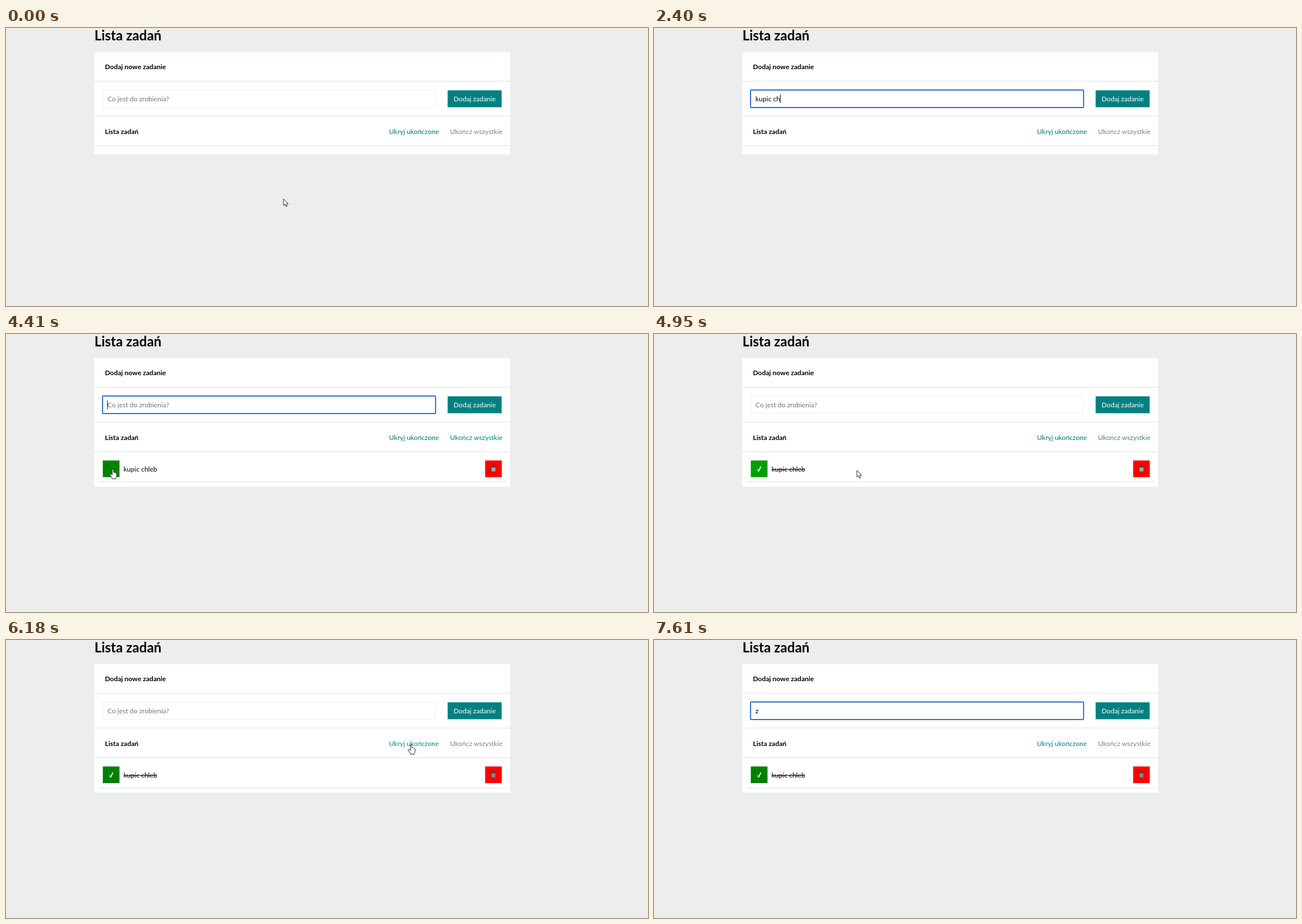
Recreate the animation shown at these times as an HTML page. Size 1136 px wide and 493 px high, loop 8 s.

```html
<!DOCTYPE html>
<html lang="pl">
<head>
<meta charset="utf-8">
<title>Lista zadań</title>
<style>
  html, body { margin: 0; width: 100%; height: 100%; overflow: hidden; background: #eceeee; }
  svg { display: block; width: 1136px; height: 493px; }
  text { font: 12px Lato, sans-serif; white-space: pre; }
  .bold { font-weight: 700; }
  .title { font-size: 24px; }
  .white { fill: #fff; }
  .line { fill: #eceeee; }
  .end { text-anchor: end; }

  /* hard switches */
  .focus, .item, .done, .hide, .show, .arrow, .beam, .hand, .lattice {
    animation: 8s step-end infinite;
  }
  .focus { animation-name: focus; }
  .item { animation-name: item; }
  .done { animation-name: done; }
  .hide { animation-name: hide; }
  .show { animation-name: show; }
  .arrow { animation-name: arrow; }
  .beam { animation-name: beam; }
  .hand { animation-name: hand; }
  .lattice { animation-name: lattice; }

  @keyframes focus {
    0%, 57.125% { visibility: hidden; }
    6.625%, 88.375% { visibility: visible; }
  }
  @keyframes item {
    0%, 70.875% { visibility: hidden; }
    46.5%, 74.25% { visibility: visible; }
  }
  @keyframes done {
    0%, 70.875% { visibility: hidden; }
    58.125%, 74.25% { visibility: visible; }
  }
  @keyframes lattice {
    0%, 70.875% { visibility: hidden; }
    46.5% { visibility: visible; }
  }
  @keyframes hide {
    0%, 74.25% { visibility: visible; }
    70.875% { visibility: hidden; }
  }
  @keyframes show {
    0%, 74.25% { visibility: hidden; }
    70.875% { visibility: visible; }
  }
  @keyframes arrow {
    0%, 4.1%, 49.375%, 59.625%, 78.75% { visibility: visible; }
    3.625%, 5.375%, 54.75%, 66.25%, 86.25% { visibility: hidden; }
  }
  @keyframes beam {
    0%, 4.1%, 18.25%, 49.375%, 94.625% { visibility: hidden; }
    3.625%, 5.375%, 46.875%, 86.25% { visibility: visible; }
  }
  @keyframes hand {
    0%, 59.625%, 78.75% { visibility: hidden; }
    54.75%, 66.25% { visibility: visible; }
  }

  /* smooth changes */
  .cursor { animation: move 8s linear infinite; }
  @keyframes move {
    0%, .375% { transform: translate(491px, 303px); }
    2.5% { transform: translate(430px, 210px); }
    4.375% { transform: translate(372px, 91px); }
    6% { transform: translate(357px, 123px); }
    6.625%, 46.875% { transform: translate(356px, 126.5px); animation-timing-function: ease-in-out; }
    55.625%, 59% { transform: translate(188px, 240px); animation-timing-function: ease-in; }
    61.875% { transform: translate(358px, 242px); }
    66.75% { transform: translate(760px, 189px); animation-timing-function: ease-out; }
    68.75%, 77.5% { transform: translate(717px, 185px); animation-timing-function: ease-in; }
    84% { transform: translate(470px, 216px); }
    85% { transform: translate(410px, 200px); }
    87% { transform: translate(345px, 110px); }
    88.25%, 100% { transform: translate(333px, 122.5px); }
  }
  .tick { fill: #008000; animation: tick 8s linear infinite; }
  @keyframes tick {
    0%, 54.75% { fill: #008000; }
    59%, 60% { fill: #00aa00; }
    61.875% { fill: #009f00; }
    66.25%, 100% { fill: #008000; }
  }
  .toggle { animation: toggle 8s linear infinite; }
  @keyframes toggle {
    0%, 66.25% { fill: #007575; }
    70%, 78.75% { fill: #088888; }
    84%, 100% { fill: #008080; }
  }
  .all { animation: all 8s linear infinite; }
  @keyframes all {
    0%, 46.5%, 64.4%, 100% { fill: #808080; }
    52.75%, 58.125% { fill: #008080; }
  }
</style>
</head>
<body>
<svg viewBox="0 0 1136 493">
  <text class="bold title" x="156.5" y="22">Lista zadań</text>

  <rect class="white" x="156.5" y="43" width="735.5" height="181"/>
  <rect class="line" x="156" y="93.5" width="737" height="2"/>
  <rect class="line" x="156" y="155.2" width="737" height="2"/>
  <rect class="line" x="156" y="207.7" width="737" height="2"/>

  <text class="bold" x="175" y="73">Dodaj nowe zadanie</text>
  <rect x="171.5" y="110.5" width="588" height="30" fill="#fff" stroke="#eceeee"/>
  <rect class="focus" x="170.8" y="109.8" width="589.4" height="31.4" rx="1.5" fill="#fff" stroke="#1159cf" stroke-width="1.7"/>
  <text id="hint" x="179.5" y="130" fill="#757575">Co jest do zrobienia?</text>
  <text id="typed" x="179.5" y="130"></text>
  <rect id="caret" y="118" width="1" height="15" visibility="hidden"/>
  <rect x="781.5" y="110.5" width="95.5" height="30" fill="#008080"/>
  <text class="white" x="829.3" y="130" text-anchor="middle">Dodaj zadanie</text>

  <text class="bold" x="175" y="187.5">Lista zadań</text>
  <g class="toggle">
    <text class="end hide" x="766" y="187.5">Ukryj ukończone</text>
    <text class="end show" x="766" y="187.5">Pokaż ukończone</text>
  </g>
  <text class="end all" x="878.7" y="187.5">Ukończ wszystkie</text>

  <g class="item">
    <rect class="white" x="156.5" y="223" width="735.5" height="47.7"/>
    <rect class="line" x="164" y="261.3" width="721" height="2"/>
    <rect class="tick" x="171.3" y="224.3" width="29.5" height="29.5"/>
    <text x="208" y="244">kupic chleb</text>
    <rect x="847.8" y="224.3" width="29.5" height="29.5" fill="#f00"/>
    <path d="M858.2 236.2H867L866 244.5H859.2Z" fill="#6f8f88" stroke="#3b4a46" stroke-width=".8"/>
    <path d="M857.3 235.2H867.9M860.8 234.2H864.4" stroke="#3b4a46" stroke-width="1.4"/>
  </g>
  <path class="lattice" d="M860.4 237V244M862.6 237V244M864.8 237V244M859 239H866.4M859.3 241.6H866" fill="none" stroke="#b9cbc6" stroke-width=".7"/>
  <g class="done">
    <path d="M183 240.2L185.2 243L189.2 235.2" fill="none" stroke="#fff" stroke-width="1.7"/>
    <rect x="208" y="240" width="58" height="1"/>
  </g>

  <g class="cursor">
    <path class="arrow" d="M0 0V12L2.8 9.5L4.7 13.8L6.5 13L4.7 8.8H8.4Z" fill="#fff" stroke="#111" stroke-width=".9"/>
    <path class="beam" d="M-3 -6H-.7L0 -5.4L.7 -6H3M0 -5.4V5.4M-3 6H-.7L0 5.4L.7 6H3" fill="none" stroke="#222"/>
    <path class="hand" d="M-1.2 1Q0 -1 1.2 1V6.2Q2.5 5.2 3.4 6.7Q4.7 6 5.3 7.4Q6.8 7 7 8.8V12Q6.7 14.5 5.4 15.5V17.5H-1.6V15.8L-5.2 10.6Q-5.8 8.6 -3.8 8.8L-1.2 11Z" fill="#fff" stroke="#111" stroke-width=".9"/>
  </g>
</svg>
<script>
  const LOOP = 8000;
  const [hint, typed, caret] = ['hint', 'typed', 'caret'].map(id => document.getElementById(id));

  const phrase = 'kupic chleb';
  const keyTimes = [1460, 1690, 1830, 2000, 2070, 2170, 2370, 2400, 2670, 2760, 3060];
  const enterTime = 3720;
  const lastKeyTime = 7610;
  const caretSpans = [[530, 1030], [1460, 3720], [4190, 4570], [7070, 7570]];

  function textAt(t) {
    if (t >= lastKeyTime) return 'z';
    if (t >= enterTime) return '';
    return phrase.slice(0, keyTimes.filter(k => k <= t).length);
  }

  let start;
  function draw(now) {
    start ??= now;
    const t = (now - start) % LOOP;
    const text = textAt(t);
    if (typed.textContent !== text) typed.textContent = text;
    hint.setAttribute('visibility', text ? 'hidden' : 'visible');
    const width = text ? typed.getComputedTextLength() : 0;
    caret.setAttribute('x', Math.round(179 + width));
    const lit = caretSpans.some(([from, to]) => t >= from && t < to);
    caret.setAttribute('visibility', lit ? 'visible' : 'hidden');
    requestAnimationFrame(draw);
  }
  requestAnimationFrame(draw);
</script>
</body>
</html>
```
